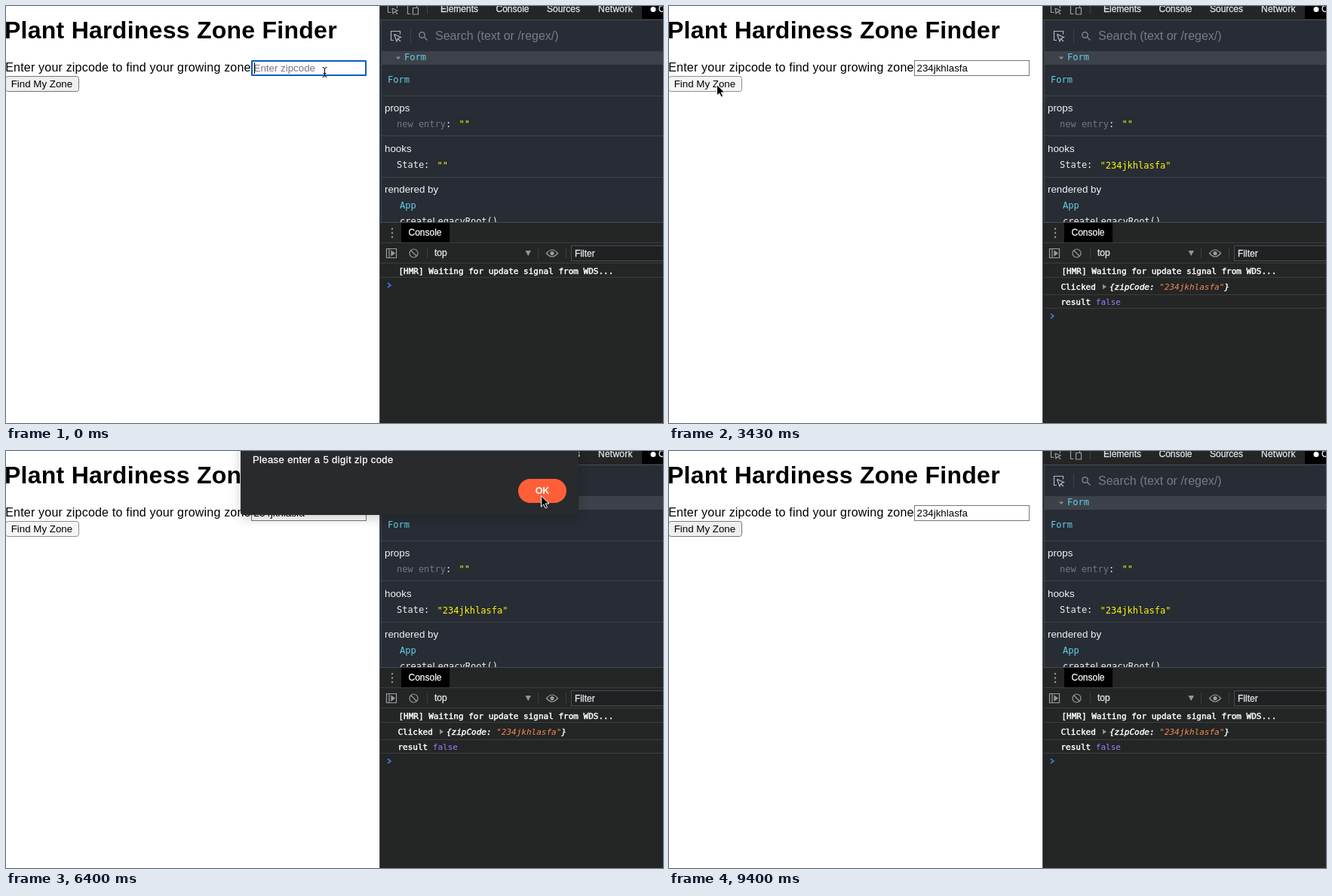
Animation, 871 px wide and 554 px high, one loop 9550 ms. Source, as an HTML page:

```html
<!DOCTYPE html>
<html lang="en">
<head>
<meta charset="utf-8">
<title>Zone finder form</title>
<style>
html, body { margin: 0; width: 100%; height: 100%; overflow: hidden; background: #fff; }
#stage { position: relative; width: 871px; height: 554px; overflow: hidden; }
#stage > svg { position: absolute; left: 0; top: 0; overflow: hidden; }
text { white-space: pre; }
text, #alert { font-family: "Liberation Sans", Arial, sans-serif; }
.title { font-size: 32px; font-weight: bold; letter-spacing: .26px; }
.label { font-size: 16px; letter-spacing: .2px; }
.field { font-size: 13.333px; }
.ui { font-size: 12px; fill: #e4e5e7; stroke: #e4e5e7; stroke-width: .3px; }
.head { font-size: 13.33px; fill: #f2f3f5; }
.code, .log, .tip { font-family: "DejaVu Sans Mono", Menlo, monospace; }
.code { font-size: 12px; fill: #f0f1f3; }
.log { font-size: 11px; fill: #fff; stroke: #fff; stroke-width: .45px; }
.tip { font-size: 11px; font-weight: bold; fill: #d7d7d7; }
.code.cyan { fill: #61cfe6; }
.code.yellow { fill: #f8f80c; }
.code.dim { fill: #737880; }
.icon { fill: none; stroke: #9a9da1; stroke-width: 1.2px; }
.rule { fill: none; stroke: #3d424a; }
.rule.gray { stroke: #3b3d3f; }
.rule.split { stroke: #494c50; }
#button { fill: #efefef; stroke: #767676; }
#button.hover { fill: #e5e5e5; stroke: #4f4f4f; }
#button.pressed { fill: #f5f5f5; stroke: #8d8d8d; }
#alert {
  position: absolute; left: 311px; top: -60px; width: 448px; height: 145px;
  background: #292a2d; border-radius: 4px; color: #fff;
  box-shadow: 0 4px 16px rgba(0, 0, 0, .2); transform-origin: 50% 100%;
}
#alert p {
  position: absolute; left: 16px; top: 64px; margin: 0; white-space: nowrap;
  font-size: 13px; line-height: 16px; letter-spacing: .4px; -webkit-text-stroke: .3px #fff;
}
#alert b {
  position: absolute; left: 368px; top: 97px; width: 64px; height: 32px; background: #fb542b;
  border-radius: 16px; font-size: 12.5px; line-height: 32px; text-align: center;
}
#alert b.hover { background: #ff5f38; }
</style>
</head>
<body>
<div id="stage">
  <svg width="871" height="554">
    <!-- page -->
    <text class="title" x="-2" y="43">Plant Hardiness Zone Finder</text>
    <text class="label" x="-.8" y="87">Enter your zipcode to find your growing zone</text>
    <rect x="325.5" y="72.5" width="152" height="20" fill="#fff" stroke="#767676"/>
    <rect id="ring" x="326" y="73" width="151" height="19" rx="1.5" fill="#fff" stroke="#0b5cc4" stroke-width="2"/>
    <text class="field" id="entry" x="328.5" y="87"></text>
    <rect id="caret" y="75" width="1" height="15"/>
    <rect id="button" x="-.5" y="93.5" width="97" height="20" rx="3"/>
    <text class="field" x="6.7" y="108">Find My Zone</text>
    <g id="highlight">
      <rect y="72" width="496" height="42" fill="rgba(120,170,210,.7)"/>
      <rect x="4" y="119" width="133" height="20" rx="2" fill="#333740"/>
      <text class="tip" x="9" y="132" style="fill:#e87de0">Form</text>
      <path d="M43.5 122v14" stroke="#a9abb0"/>
      <text class="tip" x="52" y="132">496px × 42px</text>
    </g>

    <!-- tools -->
    <rect x="495" width="376" height="554" fill="#242525"/>
    <path class="rule split" d="M495.5 0v554M496 18.5h375"/>
    <rect x="843" width="28" height="17" fill="#000"/>
    <g class="icon">
      <path d="M506.5 0v8.5h4M518.5 0v3M512 3l7 3-3 1.5 3 3.5M512 3l1 7 2.5-2.5"/>
      <path d="M532.5 0v10.5h4M539.5 2.5h7v8.5h-7zM544.5 0v2"/>
    </g>
    <path class="rule" d="M558.5 0v11"/>
    <text class="ui" x="576" y="8">Elements</text>
    <text class="ui" x="649.5" y="8">Console</text>
    <text class="ui" x="717" y="8">Sources</text>
    <text class="ui" x="785" y="8" letter-spacing=".25">Network</text>
    <circle cx="858" cy="4.5" r="3.5" fill="#fff"/>
    <text class="ui" x="865" y="8">Components</text>

    <rect x="496" y="19" width="375" height="269" fill="#282c34"/>
    <path class="rule" d="M497.5 19v269"/>
    <path class="icon" d="M514 45.5h-3.5v-12h12v4M514.5 37.5l3.5 9.5 1.5-3.5 3.5 3.5M514.5 37.5l9 4-3.5 1.5" style="stroke:#b0b4ba"/>
    <path class="rule" d="M536.5 30v20"/>
    <g class="icon" style="stroke:#7d828b;stroke-width:1.5px"><circle cx="551.5" cy="38.5" r="3.7"/><path d="M554.5 41.5l4 4"/></g>
    <text x="569" y="45" font-size="16" fill="#777b83">Search (text or /regex/)</text>
    <rect x="498" y="60" width="373" height="18" fill="#3d424a"/>
    <path d="M517 67.5h6l-3 3.5z" fill="#8b9098"/>
    <text class="code cyan" x="528" y="72">Form</text>
    <text class="code cyan" x="506" y="102">Form</text>
    <path class="rule" d="M498 119.5h373M498 172.5h373M498 227.5h373"/>
    <text class="head" x="502" y="140">props</text>
    <text class="code dim" x="518" y="161">new entry</text>
    <text class="code" x="583" y="161">:</text>
    <text class="code yellow" x="600.5" y="161">""</text>
    <text class="head" x="502" y="194">hooks</text>
    <text class="code" x="518" y="215">State:</text>
    <text class="code yellow" id="state" x="571.5" y="215.5"></text>
    <text class="head" x="502" y="248">rendered by</text>
    <text class="code cyan" x="522" y="268.5">App</text>
    <text class="code" x="522" y="289.5">createLegacyRoot()</text>

    <!-- drawer -->
    <rect x="496" y="287" width="375" height="267" fill="#242525"/>
    <path class="rule split" d="M496 287.5h375"/>
    <path class="rule gray" d="M496 314.5h375M496 341.5h375M496 360.5h375M558.5 321v14M705.5 321v14M742.5 321v14"/>
    <rect x="524" y="288" width="64" height="26" fill="#000"/>
    <path d="M512 296h.01M512 301.5h.01M512 307h.01" stroke="#96999c" stroke-width="2.4" stroke-linecap="round"/>
    <text class="ui" x="533.5" y="305" style="fill:#fff">Console</text>
    <g class="icon">
      <path d="M504.5 322.5h13v12h-13zM508 322.5v12"/>
      <path d="M511 325.5l4 3-4 3z" fill="#9a9da1"/>
      <circle cx="540.5" cy="328.5" r="5.5"/><path d="M536.5 324.5l8 8"/>
      <path d="M716.5 328.5q7.5-9 15 0q-7.5 9-15 0z"/>
      <circle cx="724" cy="328.5" r="2" fill="#9a9da1"/>
    </g>
    <text class="ui" x="568" y="332">top</text>
    <path d="M688.5 325h7.5l-3.75 7z" fill="#94979a"/>
    <rect x="749.5" y="318.5" width="130" height="20" fill="#202122" stroke="#4b4d50"/>
    <text class="ui" x="754" y="333">Filter</text>
    <text class="log" x="520.5" y="356">[HMR] Waiting for update signal from WDS...</text>
    <g id="logs">
      <text class="log" x="519.5" y="377">Clicked</text>
      <path d="M575 369.5v7l5-3.5z" fill="#8f9295"/>
      <text class="log" x="584" y="377" font-style="italic">{zipCode: <tspan fill="#f28b54" stroke="none">"234jkhlasfa"</tspan>}</text>
      <text class="log" x="519.5" y="397">result <tspan fill="#9980ff" stroke="none">false</tspan></text>
      <path class="rule gray" d="M496 383.5h375M496 401.5h375"/>
    </g>
    <path id="prompt" d="M506 368l4 3-4 3" fill="none" stroke="#3f78e0" stroke-width="1.6"/>
  </svg>

  <div id="alert"><p>Please enter a 5 digit zip code</p><b id="ok">OK</b></div>

  <svg width="871" height="554">
    <path id="beam" d="M419.5 81.5q3 0 3 2.5v8q0 2.5-3 2.5M425.5 81.5q-3 0-3 2.5v8q0 2.5 3 2.5M420.5 89.5h4" fill="none" stroke="#000"/>
    <path id="arrow" d="M.5 .5V15l3.3-3.1 2.3 5 2.5-1.1-2.3-4.9h4.7z" fill="#000" stroke="#fff" stroke-linejoin="round"/>
  </svg>
</div>
<script>
const LOOP = 9550, TICKS = 64, LEAD = 17;
const CLICK = 22, DISMISS = 50;
const KEYS = "234jk hl asf a"; // one key per tick, a space is a pause
const SYNC = 7;                // the tools refresh every SYNC ticks

const easeInOut = p => p < .5 ? 4 * p ** 3 : 1 - 4 * (1 - p) ** 3;
const easeOut = p => 1 - (1 - p) ** 2;
const home = [422, 93];
const moves = [
  { start: 14, end: 21, to: [63, 104], ease: easeInOut },
  { start: 28, end: 34, to: [366, 76], ease: easeInOut },
  { start: 36.5, end: 43, to: [709, 59], ease: easeOut },
  { start: 54, end: 55, to: [680, 82], ease: easeInOut },
  { start: 55, end: 61, to: [790, 532], ease: easeInOut },
  { start: 61, end: 62, to: [819, 546], ease: easeInOut },
];

const $ = id => document.getElementById(id);
const clamp = p => Math.min(1, Math.max(0, p));
const within = (tick, from, to) => tick >= from && tick < to;
const show = (id, on) => { $(id).style.display = on ? "" : "none"; };

const typedAt = tick => KEYS.slice(0, Math.max(0, tick - 3)).replaceAll(" ", "");
const syncedAt = tick => typedAt(tick - (tick + SYNC - 2) % SYNC);

function pointerAt(tick) {
  return moves.reduce((from, { start, end, to, ease }) => {
    const p = ease(clamp((tick - start) / (end - start)));
    return from.map((v, i) => v + (to[i] - v) * p);
  }, home);
}

function alertAt(tick) {
  if (tick < DISMISS) return clamp((tick - CLICK - 1) / 2);
  return tick === DISMISS ? .2 : 0;
}

function drawForm(tick, pointerX) {
  const text = typedAt(tick);
  const focused = tick < CLICK;
  const entry = $("entry");
  entry.textContent = text || "Enter zipcode";
  entry.setAttribute("fill", text ? "#000" : "#757575");
  const width = text ? entry.getComputedTextLength() : 0;
  $("caret").setAttribute("x", Math.round(328.5 + width));
  show("caret", focused);
  show("ring", focused);
  const pressed = within(tick, CLICK, DISMISS);
  const hover = tick === DISMISS || focused && pointerX < 97;
  $("button").setAttribute("class", pressed ? "pressed" : hover ? "hover" : "");
  show("highlight", within(tick, DISMISS + 1, 56));
}

function drawTools(tick) {
  const logged = tick > CLICK;
  $("state").textContent = `"${syncedAt(tick)}"`;
  show("logs", logged);
  $("prompt").setAttribute("transform", `translate(0 ${logged ? 41 : 0})`);
}

function drawAlert(tick, pointerX) {
  const open = alertAt(tick), away = 1 - open;
  const { style } = $("alert");
  style.opacity = open;
  style.transform = away
    ? `translateY(${-20 * away}px) perspective(300px) rotateX(${12 * away}deg) scaleY(${1 + .12 * away})`
    : "none";
  $("ok").className = pointerX > 674 ? "hover" : "";
}

function drawPointer(tick, [x, y]) {
  show("beam", tick < 4);
  show("arrow", within(tick, 15, 63));
  $("arrow").setAttribute("transform", `translate(${Math.round(x)} ${Math.round(y)})`);
}

const begin = performance.now();
function render() {
  const time = (performance.now() - begin) % LOOP;
  const tick = Math.floor((time + LEAD) * TICKS / LOOP);
  const pointer = pointerAt(tick);
  drawForm(tick, pointer[0]);
  drawTools(tick);
  drawAlert(tick, pointer[0]);
  drawPointer(tick, pointer);
  requestAnimationFrame(render);
}
render();
</script>
</body>
</html>
```
